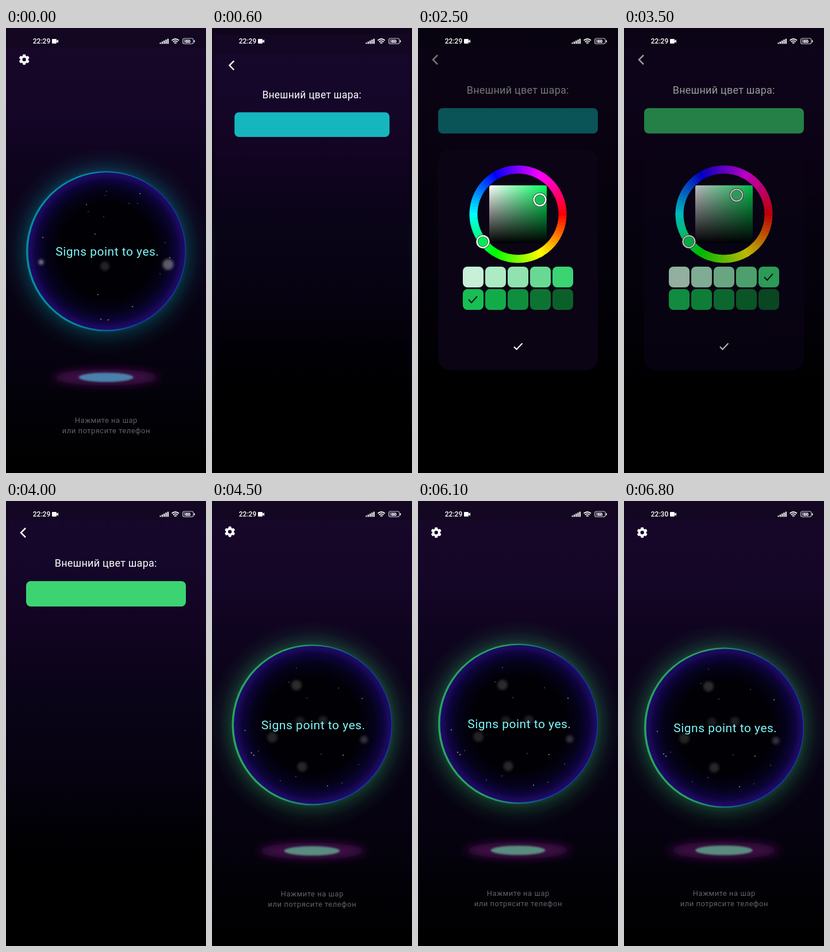
An HTML page that plays this animation: 348x772 px, repeating every 6.9 s.

```html
<!DOCTYPE html>
<html lang="ru">
<head>
<meta charset="utf-8">
<title>Magic ball</title>
<style>
  html, body { margin: 0; width: 100%; height: 100%; overflow: hidden; background: #000; }
  svg { display: block; width: 348px; height: 772px; }
  text { font-family: Roboto, sans-serif; fill: #fff; }
  .mid { text-anchor: middle; }
  .hint { font-size: 13px; letter-spacing: .5px; fill: #646269; }
  .page { transform-origin: 174px 386px; }
  .line { fill: none; stroke: #fff; stroke-width: 2; }
  .rim { stop-color: var(--rim); }
  .hue { stop-color: var(--hue); }
</style>
</head>
<body>
<svg id="stage" viewBox="0 0 348 772">
  <defs>
    <linearGradient id="homeBg" x2="0" y2="1">
      <stop offset="0" stop-color="#170829"/>
      <stop offset=".17" stop-color="#150628"/>
      <stop offset=".31" stop-color="#0e041e"/>
      <stop offset=".52" stop-color="#090316"/>
      <stop offset=".77" stop-color="#05020e"/>
      <stop offset=".86" stop-color="#020106"/>
      <stop offset="1" stop-color="#000"/>
    </linearGradient>
    <linearGradient id="setBg" x2="0" y2="1">
      <stop offset="0" stop-color="#17082b"/>
      <stop offset=".12" stop-color="#15072a"/>
      <stop offset=".26" stop-color="#130423"/>
      <stop offset=".43" stop-color="#0a0418"/>
      <stop offset=".62" stop-color="#060210"/>
      <stop offset=".75" stop-color="#010004"/>
      <stop offset=".83" stop-color="#000"/>
    </linearGradient>
    <radialGradient id="glow">
      <stop offset=".76" class="rim" stop-opacity=".36"/>
      <stop offset=".82" class="rim" stop-opacity=".2"/>
      <stop offset=".9" class="rim" stop-opacity=".07"/>
      <stop offset="1" class="rim" stop-opacity="0"/>
    </radialGradient>
    <linearGradient id="edge" y2=".15">
      <stop offset="0" class="rim"/>
      <stop offset=".4" class="rim"/>
      <stop offset=".85" stop-color="#17379a"/>
      <stop offset="1" stop-color="#1c3aa4"/>
    </linearGradient>
    <radialGradient id="inside">
      <stop offset=".6" stop-color="#010005"/>
      <stop offset=".78" stop-color="#04021a"/>
      <stop offset=".9" stop-color="#0d043c"/>
      <stop offset=".96" stop-color="#1c0858"/>
      <stop offset="1" stop-color="#140f6c"/>
    </radialGradient>
    <linearGradient id="sat">
      <stop offset="0" stop-color="#fff"/>
      <stop offset="1" class="hue"/>
    </linearGradient>
    <linearGradient id="val" x2="0" y2="1">
      <stop offset="0" stop-opacity="0"/>
      <stop offset="1"/>
    </linearGradient>
    <filter id="soft" x="-50%" y="-50%" width="200%" height="200%"><feGaussianBlur stdDeviation="2"/></filter>
    <filter id="haze" x="-30%" y="-150%" width="160%" height="400%"><feGaussianBlur stdDeviation="9 7"/></filter>
    <filter id="fuzz" x="-20%" y="-50%" width="140%" height="200%"><feGaussianBlur stdDeviation="1.4"/></filter>
  </defs>

  <g id="home" class="page">
    <rect width="348" height="772" fill="url(#homeBg)"/>
    <rect width="348" height="34" opacity=".16"/>
    <g id="gear" fill="#fff" transform="translate(31.7 54.7)">
      <circle r="5.1" fill="none" stroke="#fff" stroke-width="3.9"/>
    </g>
    <g id="shade">
      <ellipse rx="90" ry="14" fill="#431049" filter="url(#haze)"/>
      <ellipse id="core" rx="47.5" ry="8" filter="url(#fuzz)"/>
    </g>
    <g id="ball">
      <circle r="180" fill="url(#glow)"/>
      <circle r="139" fill="url(#edge)"/>
      <circle cx="1.1" cy="-.2" r="136.6" fill="url(#inside)"/>
    </g>
    <g id="dust"></g>
    <text id="answer" class="mid" x="176.3" font-size="21" letter-spacing=".5" style="fill:#80f6fa">Signs point to yes.</text>
    <text class="mid hint" x="174.3" y="685">Нажмите на шар</text>
    <text class="mid hint" x="174.3" y="703">или потрясите телефон</text>
  </g>

  <rect id="scrim" width="348" height="772"/>

  <g id="settings" class="page">
    <rect width="348" height="772" fill="url(#setBg)"/>
    <rect width="348" height="34" opacity=".16"/>
    <path class="line" d="M34 47l-8 8 8 8" style="stroke-width:2.5"/>
    <text class="mid" x="173.7" y="114" font-size="18" letter-spacing=".25">Внешний цвет шара:</text>
    <rect id="button" x="35" y="139" width="278" height="44" rx="8"/>
  </g>

  <rect id="dim" width="348" height="772"/>
  <g id="dialog">
    <rect x="35" y="210" width="278" height="384" rx="22" fill="#0a0415"/>
    <g id="wheel" fill="none" stroke-width="14"></g>
    <rect x="124" y="273" width="100" height="100" rx="3" fill="url(#sat)"/>
    <rect x="124" y="273" width="100" height="100" rx="3" fill="url(#val)"/>
    <g id="swatches"></g>
    <path id="mark" class="line" d="M-8 0l5 5.500 10-11" style="stroke:#06180f"/>
    <path class="line" d="M167 553l4.500 4.500 10-10.500"/>
  </g>

  <g id="status" fill="#fff">
    <text id="clock" x="46.800" y="27" font-size="12" font-weight="500"></text>
    <path d="M80 20q0-1 1-1h6q1 0 1 1v2.300l3-2.300v6l-3-2.300v2.300q0 1-1 1h-6q-1 0-1-1z"/>
    <g fill="none" stroke="#fff" stroke-width="1.700">
      <path d="M288.500 21.500q6.200-5 12.400 0M290.600 24q4.100-3.200 8.200 0M292.700 26.300q2-1.500 4 0"/>
      <rect x="307.500" y="18" width="18.500" height="9.500" rx="3" stroke-width="1.100" stroke="#c9c6cf"/>
    </g>
    <rect x="309.300" y="19.800" width="11" height="6" rx="1.300" fill="#77727f"/>
    <rect x="327" y="21" width="1.500" height="4" rx=".7"/>
    <text class="mid" x="316.700" y="25.700" font-size="8" font-weight="500">60</text>
  </g>
</svg>

<script>
const LOOP = 6900, STEP = 100;
const NS = 'http://www.w3.org/2000/svg';
const $ = id => document.getElementById(id);

function add(parent, tag, attrs) {
  const el = document.createElementNS(NS, tag);
  for (const k in attrs) el.setAttribute(k, attrs[k]);
  return parent.appendChild(el);
}
const set = (id, name, value) => $(id).setAttribute(name, value);
const ramp = (t, a, b) => Math.min(1, Math.max(0, (t - a) / (b - a)));
const settle = p => 1 - (1 - p) ** 4;
const smooth = p => p * p * (3 - 2 * p);
const hsl = (h, s, l) => `hsl(${h} ${s}% ${l}%)`;

// Saturation and lightness of the ten shades
const TONES = [[58, 86], [60, 80], [59, 72.5], [60, 63], [64, 53],
               [79, 41.6], [81, 37], [80, 31], [80, 25], [80, 21]];

// blobs: x, y, radius, opacity; dots: x, y (at the middle of the float)
const DUST = [
  {
    blobs: [[61, 408, 4.5, .55], [282, 412, 9.5, .42], [172, 415, 8, .16]],
    dots: [[175, 285], [173, 292], [233, 289], [214, 306], [229, 306], [140, 308], [143, 320],
           [170, 329], [155, 359], [277, 374], [268, 428], [160, 464]],
    warm: [[64, 365], [285, 400], [220, 485], [165, 507], [178, 508]]
  },
  {
    blobs: [[147, 321, 9, .2], [105, 411, 9, .16], [157, 462, 8.5, .18],
            [264, 415, 6.5, .22], [153, 383, 8, .12], [193, 382, 8, .14]],
    dots: [[147, 291], [134, 316], [261, 344], [220, 326], [165, 343], [58, 399], [81, 435],
           [119, 486], [201, 495], [226, 490], [190, 440], [228, 442], [255, 458], [146, 479]],
    warm: [[69, 438], [73, 442]]
  }
];

for (let i = 0; i < 6; i++)
  add($('gear'), 'rect', { x: -2.4, y: -9, width: 4.8, height: 4, rx: .8, transform: `rotate(${i * 60})` });

for (let i = 0; i < 5; i++)
  add($('status'), 'rect', { x: 267.5 + i * 3.3, y: 25.2 - i * 1.7, width: 2.2, height: 2.3 + i * 1.7, rx: .6 });

const clouds = DUST.map(({ blobs, dots, warm }, n) => {
  const g = add($('dust'), 'g', {});
  for (const [cx, cy, r, opacity] of blobs)
    add(g, 'circle', { cx, cy, r, opacity, fill: '#d6d2c8', filter: 'url(#soft)' });
  dots.forEach(([cx, cy], i) =>
    add(g, 'circle', { cx, cy, r: .9, fill: '#d8d4e0', opacity: i % 3 == 2 ? .8 : .4 }));
  for (const [cx, cy] of warm)
    add(g, 'circle', { cx, cy, r: 1.2, fill: n ? '#b9a894' : '#c07a3c', opacity: .75 });
  return g;
});

function onRing(deg, r = 77.5) {
  const a = deg * Math.PI / 180;
  return [174 + r * Math.cos(a), 323 + r * Math.sin(a)];
}
for (let h = 0; h < 360; h += 4)
  add($('wheel'), 'path', {
    d: `M${onRing(h - 2)}A77.5 77.5 0 0 1 ${onRing(h + 2.4)}`, stroke: hsl(h, 100, 50)
  });

const swatches = TONES.map((_, i) => add($('swatches'), 'rect', {
  x: 78 + i % 5 * 39, y: i < 5 ? 414 : 453, width: 36, height: 36, rx: 8
}));

function knob() {
  const g = add($('dialog'), 'g', {});
  add(g, 'circle', { r: 12.2, fill: '#111' });
  add(g, 'circle', { r: 11.5, fill: '#fff' });
  add(g, 'circle', { r: 9, fill: '#111' });
  const face = add(g, 'circle', { r: 8.4 });
  return (x, y, fill) => {
    g.setAttribute('transform', `translate(${x} ${y})`);
    face.setAttribute('fill', fill);
  };
}
const hueKnob = knob(), toneKnob = knob();

function drawHome(t, push, pop) {
  const green = t >= 4000;
  const wave = Math.cos((t - 5200) / 1000 * Math.PI);
  const y = 391.7 + 5.4 * wave;
  $('stage').style.setProperty('--rim', green ? '#2aa45c' : '#068c98');
  set('ball', 'transform', `translate(174 ${y})`);
  set('answer', 'y', y + 7.4);
  set('dust', 'transform', `translate(0 ${2.1 * wave})`);
  clouds.forEach((g, i) => g.setAttribute('display', i == green ? 'inline' : 'none'));
  set('shade', 'transform', `translate(174 606) scale(${1.035 + .036 * wave})`);
  set('core', 'fill', green ? '#588c7e' : '#4881aa');
  const scale = pop > 0 ? 1.1 - .1 * settle(pop) : 1 + .05 * settle(push);
  $('home').style.transform = `scale(${scale})`;
  set('scrim', 'opacity', pop > 0 ? 0 : .6 * push);
}

function drawSettings(t, push, pop) {
  const shown = ramp(push, .08, .3) * (1 - ramp(pop, .1, .5));
  const scale = pop > 0 ? 1 - .1 * settle(pop) : .85 + .15 * settle(push);
  set('settings', 'opacity', shown);
  $('settings').style.transform = `scale(${scale})`;
  set('button', 'fill', t < 3500 ? hsl(183, 79, 41.6) : hsl(142, 63, 53));
}

function drawDialog(t) {
  const shown = ramp(t, 1308, 1408) * (1 - ramp(t, 3430, 3690));
  const hue = 183 - 41 * smooth(ramp(t, 1500, 2400));
  const pick = t < 2800 ? 5 : 4;
  const shades = TONES.map(([s, l]) => hsl(hue, s, l));
  set('dim', 'opacity', .54 * shown);
  set('dialog', 'opacity', shown);
  $('stage').style.setProperty('--hue', hsl(hue, 100, 50));
  swatches.forEach((el, i) => el.setAttribute('fill', shades[i]));
  set('mark', 'transform', `translate(${96 + pick % 5 * 39} ${pick < 5 ? 432 : 471})`);
  hueKnob(...onRing(hue), hsl(hue, 100, 46));
  toneKnob(...(pick == 5 ? [212, 298] : [196, 290]), shades[pick]);
}

function frame(now) {
  const t = Math.floor(now % LOOP / STEP) * STEP;
  const push = ramp(t, 450, 900), pop = ramp(t, 4280, 4680);
  drawHome(t, push, pop);
  drawSettings(t, push, pop);
  drawDialog(t);
  $('clock').textContent = t < 6500 ? '22:29' : '22:30';
}

const start = performance.now();
function tick() {
  frame(performance.now() - start);
  requestAnimationFrame(tick);
}
tick();
</script>
</body>
</html>
```
